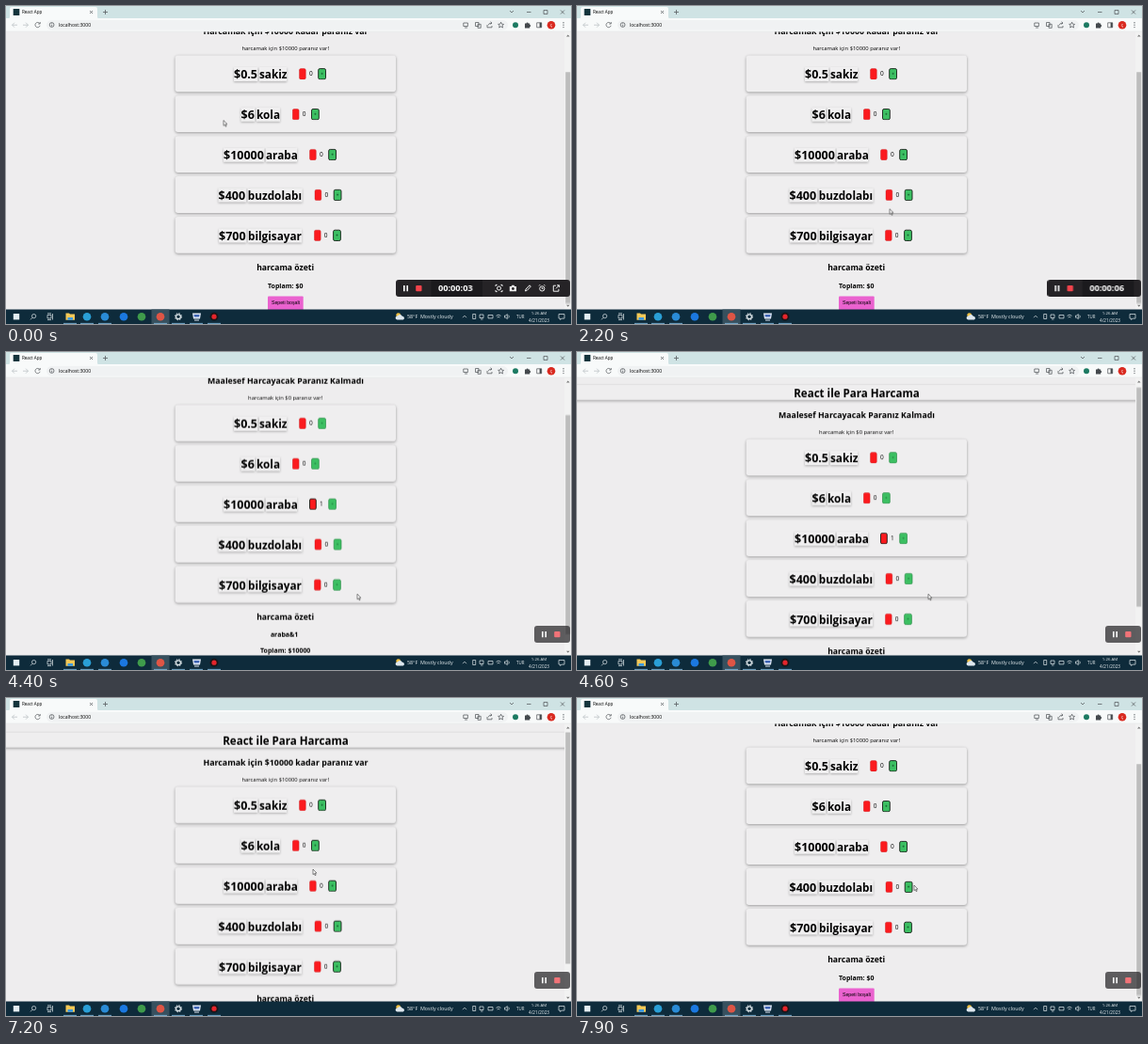
An HTML page for the animation above (8 s loop, 600x338 px).

```html
<!DOCTYPE html>
<html lang="en">
<head>
<meta charset="utf-8">
<title>React App</title>
<style>
html, body { margin: 0; width: 100%; height: 100%; overflow: hidden; }
#stage { display: block; width: 600px; height: 338px; font-family: "Open Sans", "Noto Sans", sans-serif; }
text { fill: #000; }
.bold { font-weight: 700; }
.mid { text-anchor: middle; }
.card { fill: #efeeef; filter: drop-shadow(0 1.4px 1.5px rgba(0, 0, 0, .36)); }
.label { fill: #f0eff0; filter: drop-shadow(0 1.4px 1.1px rgba(0, 0, 0, .27)); }
.red { fill: #fb1a1e; stroke: #c41c20; stroke-width: .4; }
.green { fill: #3cbf62; stroke: #2f8f4b; stroke-width: .7; }
.on { stroke: #101510; stroke-width: .85; }
.line { fill: none; stroke: #54595d; stroke-width: .75; }
.pale { fill: none; stroke: #e6edf0; stroke-width: .7; }
#bar text { fill: #eef3f5; }

#page, #thumb, #cursor, #recorder, #slide, #digits, #ring, .full, .spent { animation: 8s infinite; }
#page, #thumb { animation-name: scroll; animation-timing-function: cubic-bezier(.2, .6, .3, 1); }
#page { --top: 41.7px; }
#thumb { --top: -33.5px; }
#cursor { animation-name: point; animation-timing-function: ease-in-out; }
#recorder { animation-name: fade; animation-timing-function: linear; }
#slide { animation-name: collapse; animation-timing-function: ease-in-out; }
#digits { animation-name: tick; animation-timing-function: step-end; }
#ring { animation-name: press; animation-timing-function: step-end; }
.full { animation-name: full; animation-timing-function: step-end; }
.spent { animation-name: spent; animation-timing-function: step-end; }

@keyframes scroll {
  0%, 54.9% { transform: translateY(0); }
  58.75%, 92.5% { transform: translateY(var(--top)); }
  96.25%, 100% { transform: translateY(0); }
}
@keyframes full { 0% { opacity: 1; } 41.25% { opacity: 0; } 81.25%, 100% { opacity: 1; } }
@keyframes spent { 0% { opacity: 0; } 41.25% { opacity: 1; } 81.25%, 100% { opacity: 0; } }
@keyframes press { 0% { opacity: 0; } 40% { opacity: 1; } 46.25%, 100% { opacity: 0; } }
@keyframes tick {
  0% { transform: translateY(0); }
  1.25% { transform: translateY(-12px); }
  13.75% { transform: translateY(-24px); }
  26.25%, 100% { transform: translateY(-36px); }
}
@keyframes collapse {
  0%, 23% { transform: translateX(0); }
  31.25%, 100% { transform: translateX(147px); }
}
@keyframes fade { 0%, 43.5% { opacity: 1; } 47.5%, 100% { opacity: .72; } }
@keyframes point {
  0%, 3.75% { transform: translate(231px, 121.5px); }
  10%, 12.5% { transform: translate(247px, 152.5px); }
  23.75% { transform: translate(304px, 196px); }
  27.5% { transform: translate(332px, 215.6px); }
  35% { transform: translate(345px, 172px); }
  38.75%, 47% { transform: translate(347px, 155px); }
  53.75%, 65% { transform: translate(373px, 257.2px); }
  71.25% { transform: translate(36px, 12.5px); }
  73.75%, 82% { transform: translate(31.7px, 17px); }
  88.75%, 91.25% { transform: translate(326px, 182px); }
  97.5% { transform: translate(357px, 198.5px); }
  98.75%, 100% { transform: translate(358px, 199px); }
}
</style>
</head>
<body>
<svg id="stage" viewBox="0 0 600 338" xmlns="http://www.w3.org/2000/svg">
  <defs><clipPath id="recClip"><rect x="400" y="291" width="199" height="18" rx="3"/></clipPath></defs>
  <rect width="600" height="338" fill="#eeedee"/>

  <svg y="27.3" width="593" height="295.2" viewBox="0 27.3 593 295.2">
    <g id="page">
      <rect class="card" x="-4" y="-5" width="601" height="15.8"/>
      <text class="bold mid" x="297" y="7.7" font-size="11.55">React ile Para Harcama</text>
      <g class="mid full">
        <text class="bold" x="297" y="29.6" font-size="8.8">Harcamak için $10000 kadar paranız var</text>
        <text x="296.7" y="46.5" font-size="5.85">harcamak için $10000 paranız var!</text>
      </g>
      <g class="mid spent">
        <text class="bold" x="297" y="29.6" font-size="8.75">Maalesef Harcayacak Paranız Kalmadı</text>
        <text x="296.7" y="46.5" font-size="5.85">harcamak için $0 paranız var!</text>
      </g>
      <g id="rows"></g>
      <text class="bold mid" x="296.7" y="281" font-size="8.6">harcama özeti</text>
      <g class="mid full">
        <text class="bold" x="296.7" y="299.5" font-size="7">Toplam: $0</text>
        <rect x="278" y="308.5" width="37.7" height="16" rx="1" fill="#ea62cf"/>
        <text x="297" y="317.2" font-size="5.2" font-family="Liberation Sans, Arial, sans-serif">Sepeti boşalt</text>
      </g>
      <g class="bold mid spent" font-size="7">
        <text x="295.6" y="299.2">araba&amp;1</text>
        <text x="296.7" y="316.2">Toplam: $10000</text>
      </g>
    </g>
  </svg>

  <rect x="593" y="27.3" width="7" height="295.2" fill="#f2f2f2"/>
  <path d="M595 32.5l1.8-2 1.8 2zM595 317.8l1.8 2 1.8-2z" fill="#777"/>
  <svg x="593" y="35" width="7" height="282" viewBox="593 35 7 282">
    <g transform="translate(0 33.5)"><g id="thumb" fill="#bdbdbd">
      <rect class="full" x="594.2" y="36.5" width="5" height="246"/>
      <rect class="spent" x="594.2" y="36.5" width="5" height="233"/>
    </g></g>
  </svg>

  <g id="browser">
    <rect width="600" height="13.5" fill="#cfe3e4"/>
    <path d="M2 13.5Q4 13.5 4 11.5V3Q4 1 6 1H95Q97 1 97 3V11.5Q97 13.5 99 13.5z" fill="#f8fafa"/>
    <rect y="13" width="600" height="14.3" fill="#f8fafa"/>
    <rect x="43" y="15" width="490" height="10.6" rx="5.3" fill="#f0f2f3"/>
    <path d="M0 27.1H600" stroke="#d8dadb" stroke-width=".5"/>
    <rect x="7.7" y="3" width="6.6" height="7" fill="#14343c"/>
    <text x="17" y="8.3" font-size="4.55">React App</text>
    <text x="56" y="22.1" font-size="5.05">localhost:3000</text>
    <path class="line" d="M89 5l3 3m0-3l-3 3M103 6.5h5M105.5 4v5M535 5l2 2 2-2M553 6.5h4.5M571 4.5h4v4h-4zM589 4.5l4 4m0-4l-4 4"/>
    <path class="line" style="stroke:#b9bfc2" d="M12 20.2H6.5m2.5-2.5l-2.5 2.5 2.5 2.5M18 20.2h5.5m-2.5-2.5l2.5 2.5-2.5 2.5"/>
    <path class="line" d="M35.6 18.4a2.6 2.6 0 1 0 .5 2.4M36.2 17v2h-2M48.6 19.8v1.8M48.6 18.4v.7"/>
    <circle class="line" cx="48.6" cy="20" r="2.4"/>
    <path class="line" d="M485.8 18h4.6v3.5h-4.6zM487 23h3M498.5 17.5h3.5v4h-3.5zM501 19.3h3.2v4H501zM511 20v2.8h5V21M512 20.5q.5-2.4 4-2.4m-1.5-1.3l1.5 1.3-1.5 1.4"/>
    <path class="line" d="M525.6 17.2l.9 2 2.1.2-1.6 1.4.5 2.2-1.9-1.2-1.9 1.2.5-2.2-1.6-1.4 2.1-.2z"/>
    <circle cx="541" cy="20.3" r="3" fill="#1c7a62"/>
    <path d="M551 18.5h1.6a1 1 0 0 1 2 0h1.6v1.6a1 1 0 0 1 0 2v1.4h-5.2z" fill="#44494d"/>
    <path class="line" d="M563.7 17.8h5v5h-5z"/><path d="M566.6 17.8h2.1v5h-2.1z" fill="#44494d"/>
    <circle cx="579" cy="20.2" r="4.3" fill="#d92a20"/>
    <text class="mid" x="579" y="21.9" font-size="4.6" style="fill:#fff">ç</text>
    <path d="M592 17.7v.1m0 2.3v.1m0 2.3v.1" stroke="#4b5054" stroke-width="1.2" stroke-linecap="round"/>
  </g>

  <g id="recorder" clip-path="url(#recClip)"><g id="slide">
    <rect x="414" y="291" width="190" height="18" rx="3" fill="#252326"/>
    <rect x="451.5" y="291" width="54.5" height="18" fill="#1b1a1d"/>
    <path d="M422.8 297v6.2M426.2 297v6.2" stroke="#fff" stroke-width="1.6"/>
    <rect x="435.2" y="296.9" width="6.3" height="6.3" rx="1" fill="#f3434b"/>
    <g class="bold" font-size="9.2">
      <text x="459" y="303.4" style="fill:#fff">00:00:0</text>
      <svg x="490.4" y="294" width="7" height="12"><g id="digits"></g></svg>
    </g>
    <g class="pale" style="stroke:#f2f2f2;stroke-width:1">
      <circle cx="523.5" cy="300" r="2"/>
      <path d="M520 298v-1.6h1.6M525.4 296.4h1.6v1.6M527 302v1.6h-1.6M521.6 303.6H520V302"/>
      <path d="M551.5 303l.5-2 4-4.2 1.3 1.3-4 4.2z"/>
      <circle cx="569.3" cy="300.4" r="2.6"/><path d="M569.3 299v1.6h1.2M566 297.4l1.2-1.2M572.6 297.4l-1.2-1.2"/>
      <path d="M584 297.2h-2.7v6h5.6v-2.4M584 300.4l3.4-3.6m-2.3 0h2.3v2.3"/>
    </g>
    <path d="M534.8 298h1.8l.7-1.3h2.2l.7 1.3h1.8v5.3h-7.2z" fill="#f2f2f2"/>
    <circle cx="538.4" cy="300.5" r="1.4" fill="#252326"/>
  </g></g>

  <g id="bar">
    <rect y="322.5" width="600" height="15.5" fill="#0e2b3b"/>
    <rect x="154.5" y="322.5" width="19" height="15.5" fill="#37505e"/>
    <rect x="7.8" y="327" width="6.4" height="6.4" fill="#e4edf2"/>
    <circle class="pale" cx="29.6" cy="329.6" r="2.1"/>
    <path class="pale" d="M28 331.3l-2 2M44 328.4h4v3.6h-4zM44 326.8h4M44 333.6h4M49.5 327v6.5"/>
    <path d="M63.5 326.5h3.5l1 1h5v6.3h-9.5z" fill="#f4c957"/><path d="M65.5 331h5.5v2.8h-5.5z" fill="#3f9be0"/>
    <g id="apps"></g>
    <circle class="pale" cx="183" cy="330.2" r="2.4" style="stroke-width:1.2"/>
    <circle class="pale" cx="183" cy="330.2" r="3.6" style="stroke-width:1;stroke-dasharray:1.4 1.43"/>
    <path d="M198 326.5h9l-1 6h-7z" fill="#dde6f4"/><path d="M199.5 328h6l-.5 2.6h-5z" fill="#3f64b5"/><path d="M200 334h5" stroke="#dde6f4"/>
    <circle cx="221" cy="330.2" r="4.4" fill="#1c1517"/><circle cx="221" cy="330.2" r="2.6" fill="#e5252c"/>
    <g id="marks" stroke="#7fb6da" stroke-width=".9"></g>
    <circle cx="416.7" cy="328.6" r="2.4" fill="#f5c343"/>
    <path d="M415.4 333.5a2 2 0 0 1 .4-4 2.7 2.7 0 0 1 5 .3 1.9 1.9 0 0 1 .8 3.7z" fill="#dde7ee"/>
    <text x="426" y="332.2" font-size="5.35">58°F</text>
    <text x="440" y="332.2" font-size="5.4">Mostly cloudy</text>
    <path class="pale" d="M485 331.2l2-2 2 2M495.7 327.5h3v5h-3zM503 328h4v3.5h-4zM504 333h2.5M512 328.5h5v3.4h-5zM520.5 329.3q2.5-2.2 5 0M521.6 331q1.4-1.2 2.8 0M529.5 329h1.2l1.6-1.4v5l-1.6-1.4h-1.2zM533.7 328.6q1.2 1.4 0 3M587 327.5h6v4.6h-3l-1.3 1.4v-1.4H587z"/>
    <text x="542" y="332" font-size="4.4">TUR</text>
    <text class="mid" x="566" y="328.2" font-size="4.35">1:26 AM</text>
    <text class="mid" x="566" y="335.6" font-size="4.65">4/21/2023</text>
  </g>

  <circle id="ring" cx="348.7" cy="158.2" r="6.5" fill="#f0565a" fill-opacity=".6"/>
  <path id="cursor" d="M0 0V5.6L1.3 4.5 2.2 6.6 3.1 6.2 2.2 4.1H3.9z" fill="#fff" stroke="#333" stroke-width=".6"/>
</svg>
<script>
const fill = (id, items, draw) =>
  document.getElementById(id).innerHTML = items.map(draw).join('');

// price, name, x of price, x of name, x of minus button
const goods = [
  ['$0.5', 'sakiz', 242, 269, 311.5],
  ['$6', 'kola', 249.5, 266, 304.3],
  ['$10000', 'araba', 231, 276, 322.5],
  ['$400', 'buzdolabı', 225.5, 256.8, 328],
  ['$700', 'bilgisayar', 226, 257, 327.4]
];

const box = (cls, x, y, w, h, r) =>
  `<rect class="${cls}" x="${x}" y="${y}" width="${w}" height="${h}" rx="${r}"/>`;
const text = (x, y, size, str, cls = '') =>
  `<text class="${cls}" x="${x}" y="${y}" font-size="${size}">${str}</text>`;

function controls(x, count, canAdd) {
  return box(count ? 'red on' : 'red', x, 66.2, 6.8, 11.3, 1.6) +
    text(x + 12.3, 74, 6.5, count, 'mid') +
    box(canAdd ? 'green on' : 'green', x + 20.2, 66.2, 7.8, 11.3, 1.6) +
    `<path d="M${x + 23} 71.5h2.2m-1.1-1.1v2.2" stroke="#14532a" stroke-width=".6" opacity="${canAdd ? 1 : .5}"/>`;
}

fill('rows', goods, ([price, name, px, nx, bx], i) => `<g transform="translate(0 ${0.4 + i * 42.9})">
  ${box('card', 179.7, 52, 234.3, 38.8, 3)}
  ${box('label', px, 64.5, nx - px - 1.8, 15, .5)}${box('label', nx, 64.5, bx - 13.3 - nx, 15, .5)}
  ${text(px, 77, 12.5, price, 'bold')}${text(nx, 77, 11.75, name, 'bold')}
  <g class="full">${controls(bx, 0, true)}</g>
  <g class="spent">${controls(bx, name === 'araba' ? 1 : 0, false)}</g></g>`);

fill('digits', [3, 4, 5, 6], (n, i) => `<text y="${9.4 + i * 12}" style="fill:#fff">${n}</text>`);

fill('apps', [[86, '#2a9fd6'], [105, '#2a8bd6'], [125, '#1b78e0'], [144, '#3f9b4b'], [164, '#df5545']],
  ([x, color]) => `<circle cx="${x}" cy="330.2" r="4.3" fill="${color}"/>`);

fill('marks', [68, 86, 105, 164, 183, 202, 221], x => `<path d="M${x - 7} 337.4h14"/>`);
</script>
</body>
</html>
```
